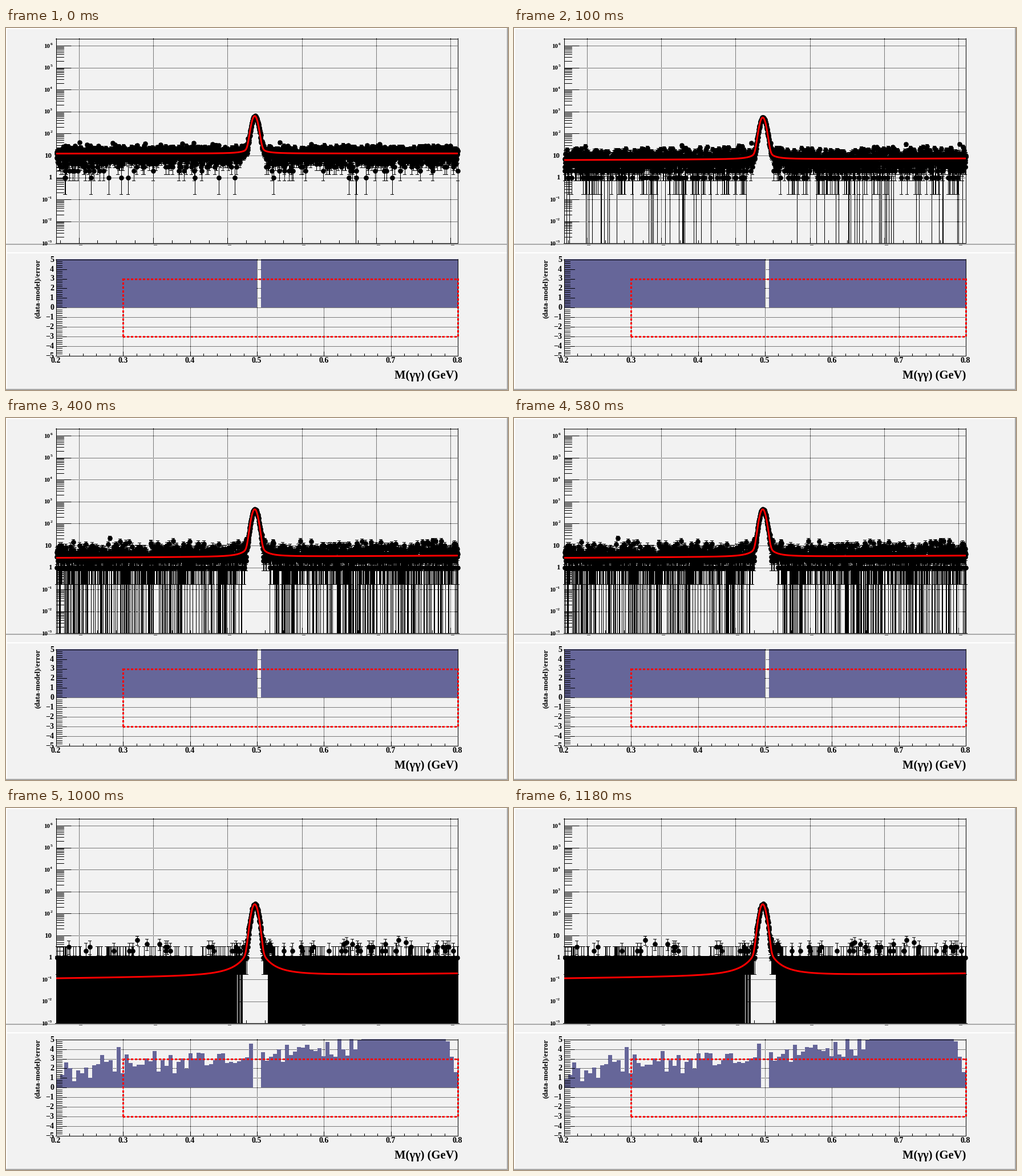
A matplotlib script for the animation above (1.3 s loop, 880 px wide and 636 px high).

```python
import numpy as np
import matplotlib.pyplot as plt
from matplotlib.animation import FuncAnimation
from matplotlib.patches import Rectangle

W, H, DPI = 880, 636, 100
PX = 72 / DPI
LEFT, RIGHT = 88, 792
TOP, BOTTOM = 18, 377           # upper plot
LOW_TOP, LOW_BOTTOM = 406, 575  # lower plot
BINS, PULL_BINS = 2400, 100
PEAK_X = 436
BG, SHADE, BLUE, RED = "#f2f2f2", "#a9a9a9", "#666699", "#ff0000"

fig = plt.figure(figsize=(W / DPI, H / DPI), dpi=DPI, facecolor=BG)
ax = fig.add_axes([0, 0, 1, 1])
ax.set_xlim(0, W)
ax.set_ylim(H, 0)
ax.axis("off")


def mid(v):
    """Centre of the pixel that holds v."""
    return np.floor(v) + 0.5


def log_y(v):
    return 262 - 38.57 * np.log10(v)


def pull_y(v):
    return 490.7 - 16.9 * v


def mass_x(m):
    return LEFT + (m - 0.2) / 0.6 * (RIGHT - LEFT) - 0.5


def rect(x, y, w, h, color, z=0):
    return ax.add_patch(Rectangle((x, y), w, h, fc=color, lw=0, zorder=z,
                                  antialiased=False))


def line(x0, y0, x1, y1, z=2, width=1, color="black", dash=None):
    style = (0, tuple(d / width for d in dash)) if dash else "-"
    ax.plot([x0, x1], [y0, y1], color=color, lw=width * PX, ls=style, zorder=z,
            antialiased=False, dash_capstyle="butt", solid_capstyle="butt")


def hline(y, x0, x1, **kw):
    line(x0, mid(y), x1, mid(y), **kw)


def vline(x, y0, y1, **kw):
    line(mid(x), y0, mid(x), y1, **kw)


def label(x, y, s, size, ha="right", va="baseline", **kw):
    ax.text(x, y, str(s).replace("-", "\u2212") if ha == "right" else s,
            fontsize=size * PX, ha=ha, va=va, weight="bold",
            family=["Liberation Serif", "DejaVu Serif"], zorder=7, **kw)


def pad(y0, y1):
    rect(0, y0, W, 2, "white")
    rect(0, y0, 2, y1 - y0, "white")
    rect(0, y1 - 2, W, 2, SHADE)
    rect(W - 2, y0, 2, y1 - y0, SHADE)


def frame(y0, y1, z):
    for y in (y0, y1):
        hline(y, LEFT - 1, RIGHT, z=z)
    for x in (LEFT - 1, RIGHT - 1):
        vline(x, y0, y1 + 1, z=z)


GRID = dict(z=1, dash=(1, 2))


def draw_upper_axes():
    for p in range(-3, 7):
        y = log_y(10.0 ** p)
        if p > -3:
            hline(y, LEFT, RIGHT, **GRID)
        hline(y, LEFT, LEFT + 25)
        for m in range(2, 10):
            ym = log_y(m * 10.0 ** p)
            if ym > TOP:
                hline(ym, LEFT, LEFT + 13)
        if p in (0, 1):
            label(81, y + 4.5, 10 ** p, 13)
        else:
            label(77 if p > 0 else 73, y + 4, 10, 11)
            label(81, y - 1, p, 7.5)
    for i in range(-1, 21):
        x = 127.3 + 32.58 * i
        major = i % 4 == 0
        vline(x, BOTTOM - (8 if major else 4), BOTTOM)
        if major:
            vline(x, TOP, BOTTOM, **GRID)
            hline(380, x + 1, x + 6, color="#666666")
    frame(TOP, BOTTOM, 2)


def draw_lower_axes():
    for i in range(-25, 26):
        y = pull_y(i / 5)
        major = i % 5 == 0
        hline(y, LEFT, LEFT + (18 if major else 10), z=6)
        if major:
            if abs(i) < 25:
                hline(y, LEFT, RIGHT, **GRID)
            label(84, y + 4.5, i // 5, 14)
    hline(pull_y(0), LEFT, RIGHT, z=6, dash=(1, 2))
    for i in range(31):
        m = 0.2 + 0.02 * i
        x = mass_x(m)
        major = i % 5 == 0
        vline(x, LOW_BOTTOM - (6 if major else 3), LOW_BOTTOM, z=6)
        if major:
            if 0 < i < 30:
                vline(x, LOW_TOP, LOW_BOTTOM, **GRID)
            label(x, 588, f"{m:.1f}", 14, ha="center")
    frame(LOW_TOP, LOW_BOTTOM, 6)
    label(792, 616, "M(\u03b3\u03b3) (GeV)", 20.7)
    label(55.5, 406, "(data-model)/error", 13, ha="center", va="top",
          rotation=90)


def draw_limits():
    x0, x1 = mass_x(0.3), mass_x(0.8)
    y0, y1 = pull_y(3), pull_y(-3)
    style = dict(z=8, width=3, color=RED, dash=(3, 3))
    for y in (y0, y1):
        hline(y, x0, x1, **style)
    for x in (x0, x1):
        vline(x, y0, y1, **style)


def errors(n):
    """Central Poisson interval around each count."""
    m, k = np.maximum(n, 1), n + 1
    lo = m * (1 - 1 / (9 * m) - 1 / (3 * np.sqrt(m))) ** 3
    up = k * (1 - 1 / (9 * k) + 1 / (3 * np.sqrt(k))) ** 3
    return np.where(n == 0, 1e-9, lo), np.where(n == 0, 1.147, up)


def base(x, left, right):
    return left * (right / left) ** ((x - LEFT) / (RIGHT - LEFT))


def peak(x, height, tail):
    """Gaussian core with wide Lorentzian tails."""
    d2 = (x - PEAK_X) ** 2
    return (height - tail / 60) * np.exp(-d2 / 39.6) + tail / (d2 + 60)


def draw_fit(step, left, right, shape):
    """Counts scatter around the model; a small shape scatters more."""
    rng = np.random.default_rng(11 + step)
    height, tail = 600 - 86 * step, 1500 - 290 * step
    x = LEFT + (np.arange(BINS) + 0.5) * (RIGHT - LEFT) / BINS
    near = abs(x - PEAK_X)
    n = rng.negative_binomial(shape, shape / (shape + base(x, left, right)))
    n += rng.poisson(np.where(near < 35, peak(x, height, tail), 0))
    n[(near < 22) & (n == 0)] = 1

    lo, up = errors(n)
    xs, y_up = mid(x), mid(log_y(up))
    y_lo = np.minimum(mid(log_y(lo)), BOTTOM + 0.5)
    caps = np.r_[xs, xs]
    style = dict(colors="black", lw=PX, antialiaseds=False, zorder=3)
    art = [ax.vlines(xs, y_up, y_lo, **style),
           ax.hlines(np.r_[y_up, y_lo], caps - 2.5, caps + 2.5, **style)]
    hit = n > 0
    art += ax.plot(xs[hit], mid(log_y(n[hit])), "o", color="black",
                   ms=8.6 * PX, mew=0, zorder=4)
    cx = np.linspace(LEFT, RIGHT, 1409)
    model = base(cx, left, right) + peak(cx, height, tail)
    art += ax.plot(cx, log_y(model), color=RED, lw=3 * PX, zorder=5,
                   solid_capstyle="butt")
    return art


def draw_pulls(pulls):
    edges = np.round(np.linspace(LEFT, RIGHT, PULL_BINS + 1))
    return [rect(a, pull_y(v), b - a, pull_y(0) - pull_y(v), BLUE, z=4)
            for a, b, v in zip(edges, edges[1:], pulls) if v > 0]


def loose_pulls():
    """Pulls climb from left to right, overflow, then fall at the edge."""
    rng = np.random.default_rng(4)
    trend = np.interp(np.arange(PULL_BINS), [0, 15, 42, 75, 76, 95, 99],
                      [1.3, 2.7, 3.0, 4.2, 6.5, 6.5, 1.6])
    pulls = np.clip(trend + rng.normal(0, 0.65, PULL_BINS), 0, 5)
    pulls[49:51] = 0
    return pulls


pad(0, 381)
pad(394, H)
rect(0, 381, 2, 13, "white")
rect(W - 2, 381, 2, 13, SHADE)
draw_upper_axes()
draw_lower_axes()
draw_limits()

# background at the left and right edge, shape of the scatter
FITS = [(11.8, 12.0, 6), (6.0, 7.1, 3), (2.65, 3.35, 2), (0.88, 1.25, 1),
        (0.106, 0.18, 0.15)]
stages = [draw_fit(i, *f) for i, f in enumerate(FITS)]
full = draw_pulls(np.where(np.arange(PULL_BINS) == 50, 0, 5))
loose = draw_pulls(loose_pulls())
for stage in stages[:-1]:
    stage += full
stages[-1] += loose


def show(i):
    # the first stage lasts one tick, the others three
    now = stages[(i + 2) // 3]
    for stage in stages:
        for a in stage:
            a.set_visible(False)
    for a in now:
        a.set_visible(True)
    return now


anim = FuncAnimation(fig, show, frames=13, interval=100, repeat=True,
                     repeat_delay=0, blit=False)
plt.show()
```
